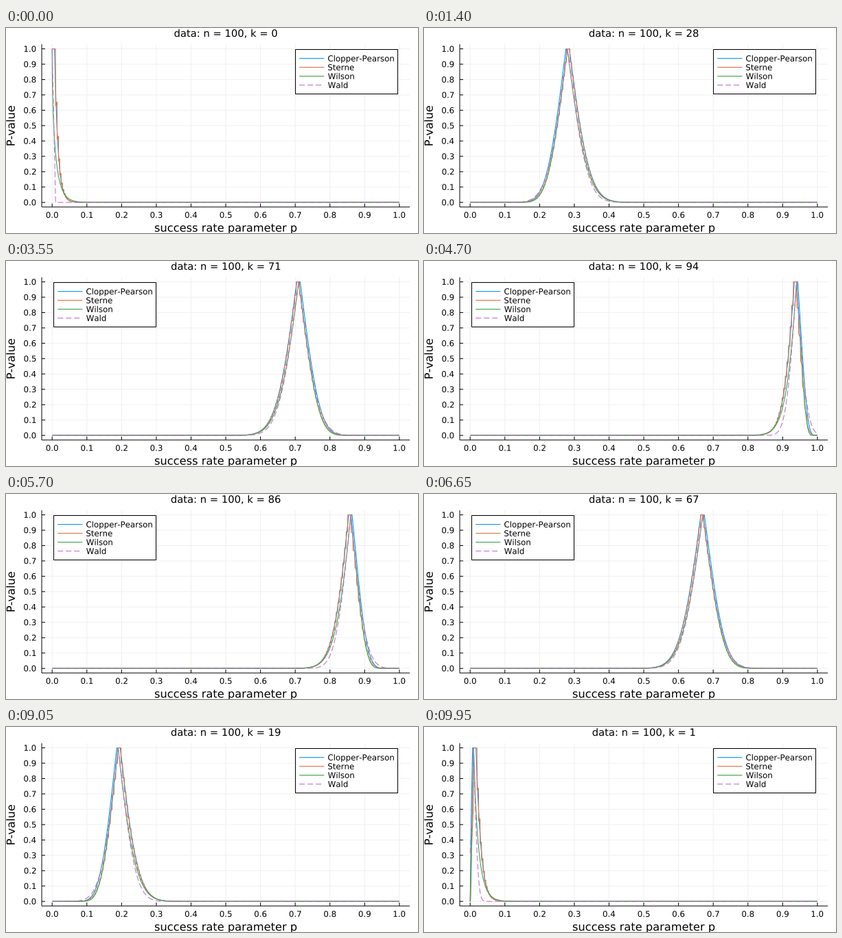
Write a matplotlib script that moves like this. It is 600 by 300 pixels and loops after 10 s.

```python
import math

import matplotlib.pyplot as plt
import numpy as np
from matplotlib.animation import FuncAnimation
from matplotlib.patches import PathPatch, Rectangle
from matplotlib.textpath import TextPath
from matplotlib.transforms import Affine2D

W, H, DPI = 600, 300, 100
N = 100
PX = 72 / DPI  # points per pixel
CURVE_WIDTH = 1.1

LABELS = ["Clopper-Pearson", "Sterne", "Wilson", "Wald"]
COLORS = ["#009afa", "#e26f46", "#3da44d", "#c271d2"]
DASH = (0, (8 / CURVE_WIDTH, 4 / CURVE_WIDTH))
STYLES = ["-", "-", "-", DASH]

plt.rcParams["font.family"] = "DejaVu Sans"
plt.rcParams["text.kerning_factor"] = 6  # practically no kerning

# binomial tables: rows are values of p, columns are counts
p = np.linspace(0, 1, 2001)
counts = np.arange(N + 1)
binom = np.array([float(math.comb(N, j)) for j in counts])
pmf = binom * p[:, None] ** counts * (1 - p[:, None]) ** (N - counts)
cdf = np.cumsum(pmf, axis=1)
ccdf = np.cumsum(pmf[:, ::-1], axis=1)[:, ::-1]
erfc = np.vectorize(math.erfc, otypes=[float])


def normal_tails(dist, sd):
    """Two-sided normal p-value; a zero distance counts as 1."""
    z = np.divide(dist, sd, out=np.full_like(dist, 40.0), where=sd > 0)
    return np.where(dist < 1e-12, 1.0, erfc(z / math.sqrt(2)))


def clopper_pearson(k):
    return np.minimum(1, 2 * np.minimum(cdf[:, k], ccdf[:, k]))


def sterne(k):
    rare = pmf <= pmf[:, k:k + 1] * (1 + 1e-7)
    return np.minimum(1, np.where(rare, pmf, 0).sum(axis=1))


def wilson(k):
    return normal_tails(np.abs(k - N * p), np.sqrt(N * p * (1 - p)))


def wald(k):
    dist = np.abs(k / N - p)
    if k in (0, N):
        return np.clip(1 - dist * N, 0, 1)
    sd = math.sqrt(k / N * (1 - k / N) / N)
    return normal_tails(dist, np.full_like(p, sd))


METHODS = [clopper_pearson, sterne, wilson, wald]


def sx(v):
    return 67.2 + 505.7 * v


def sy(v):
    return 255.2 - 224.7 * v


LEFT, RIGHT = sx(-0.03), sx(1.03)
BOTTOM, TOP = sy(-0.03), sy(1.03)

fig = plt.figure(figsize=(W / DPI, H / DPI), dpi=DPI, facecolor="white")
ax = fig.add_axes([0, 0, 1, 1])
ax.set_xlim(0, W)
ax.set_ylim(H, 0)
ax.axis("off")


def line(x, y, color="black", width=1.0, z=3, **kw):
    return ax.plot(x, y, color=color, lw=width * PX, zorder=z, snap=False,
                   solid_capstyle="butt", **kw)[0]


def glyphs(s, size, anchor):
    """Outline of s on baseline 0; anchor 0, 0.5, 1 = left, centre, right."""
    path = TextPath((0, 0), s, size=size)
    ink = path.get_extents()
    shift = ink.x0 + anchor * ink.width
    return path.transformed(Affine2D().translate(-shift, 0).scale(1, -1))


def text(x, y, s, size, anchor=0.5, angle=0, base=ax.transData):
    place = Affine2D().rotate_deg(-angle).translate(x, y)
    patch = PathPatch(glyphs(s, size, anchor), fc="black", lw=0, zorder=8,
                      snap=False, transform=place + base)
    return ax.add_patch(patch)


# grid, axes and ticks
for i in range(11):
    v = i / 10
    x, y = sx(v), sy(v)
    line([x, x], [TOP, BOTTOM], "#f0f0f0", z=1)
    line([LEFT, RIGHT], [y, y], "#f0f0f0", z=1)
    line([x, x], [BOTTOM, BOTTOM - 5], z=2)
    line([LEFT, LEFT + 5], [y, y], z=2)
    text(x, 277.8, f"{v:.1f}", 11.8)
    text(43.4, y + 4.3, f"{v:.1f}", 11.8, anchor=1)
line([LEFT, RIGHT], [BOTTOM, BOTTOM], z=2)
line([LEFT, LEFT], [TOP, BOTTOM], z=2)

MID_X = (LEFT + RIGHT) / 2
TITLE_SIZE = 14.75
title = text(MID_X, 12.9, "data", TITLE_SIZE)
text(MID_X, 298, "success rate parameter p", 16.25)
text(12.7, (TOP + BOTTOM) / 2, "P-value", 16.25, angle=90)

curves = [line(sx(p), sy(np.zeros_like(p)), c, CURVE_WIDTH, linestyle=s)
          for c, s in zip(COLORS, STYLES)]

# legend, placed as a whole by legend_shift
legend_shift = Affine2D()
legend_base = legend_shift + ax.transData
ax.add_patch(Rectangle((0, 31.5), 149, 65, fc="white", ec="black", lw=PX,
                       zorder=6, snap=False, transform=legend_base))
for i, (label, c, s) in enumerate(zip(LABELS, COLORS, STYLES)):
    y = 44.5 + 13 * i
    line([5.7, 41.9], [y, y], c, CURVE_WIDTH, z=7, linestyle=s,
         transform=legend_base)
    text(47.6, y + 4.3, label, 11.8, anchor=0, base=legend_base)
ax.set_xlim(0, W)
ax.set_ylim(H, 0)


def draw(frame):
    k = N - abs(N - frame)
    title.set_path(glyphs(f"data: n = {N}, k = {k}", TITLE_SIZE, 0.5))
    for curve, method in zip(curves, METHODS):
        curve.set_ydata(sy(method(k)))
    legend_shift.clear().translate(421.5 if k <= N / 2 else 69.5, 0)
    return [title, *curves]


anim = FuncAnimation(fig, draw, frames=2 * N, interval=50, repeat=True,
                     repeat_delay=0, blit=False)
plt.show()
```
